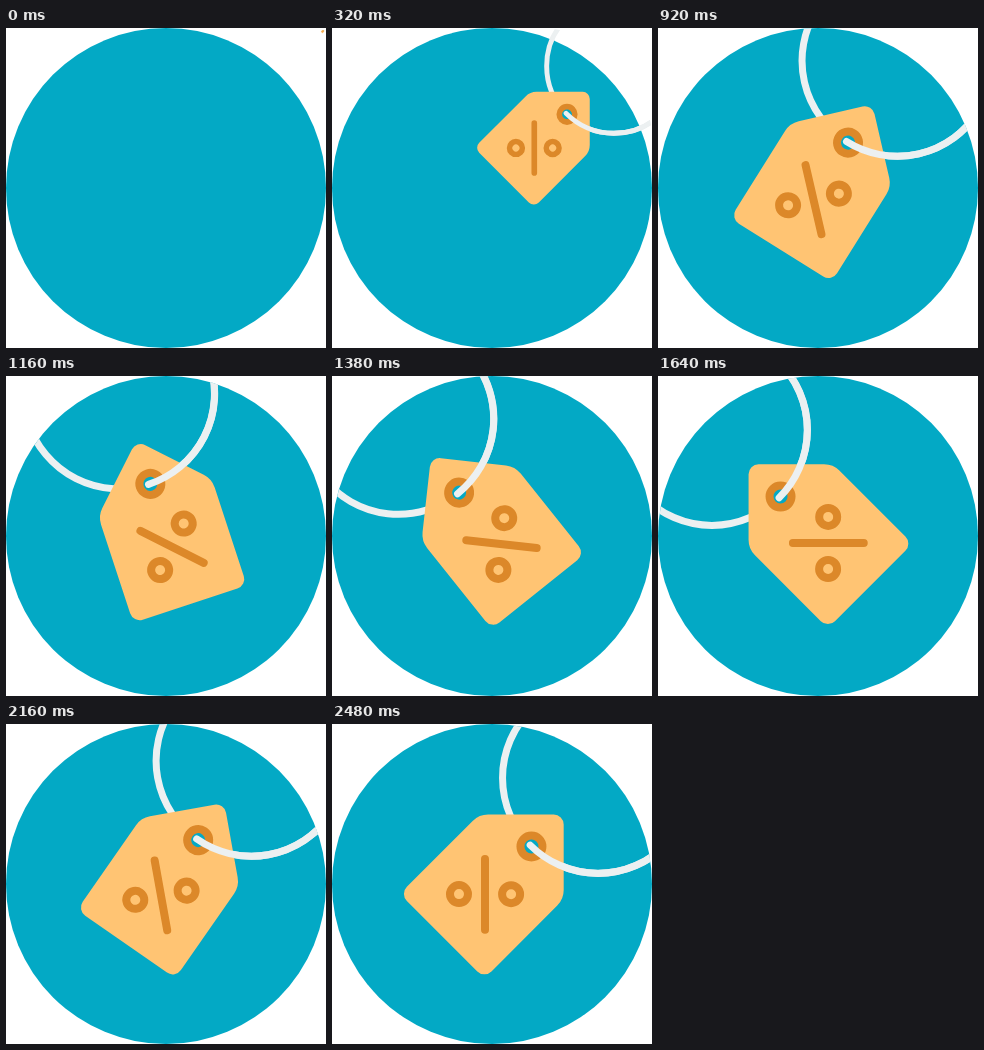
These frames come from a looping animation (320x320 px, 2500 ms). An HTML page:

```html
<!DOCTYPE html>
<html lang="en">
<head>
<meta charset="utf-8">
<title>Discount tag</title>
<style>
  html, body { margin: 0; width: 100%; height: 100%; overflow: hidden; background: #fff; }
  svg { display: block; width: 100%; height: 100%; }
  .mark { fill: none; stroke: #dc8829; stroke-width: 8; stroke-linecap: round; }
  .string { fill: none; stroke: #ecf0f1; stroke-width: 7; stroke-linecap: round; }
</style>
</head>
<body>
<svg viewBox="0 0 320 320">
  <defs>
    <clipPath id="disc"><circle r="160"/></clipPath>
  </defs>
  <circle cx="160" cy="160" r="160" fill="#03a9c5"/>
  <g id="swing">
    <g clip-path="url(#disc)">
      <circle class="string" cy="-150" r="95.5"/>
      <path id="body" fill="#ffc473"/>
      <circle class="mark" cx="1.4" cy="-54.4" r="11" style="fill:#03a9c5"/>
      <path class="string" d="M-.5 -54.5A95.5 95.5 0 0 0 0 -245.5"/>
      <path class="mark" d="M-22.7 -12.8L27.4 37.3"/>
      <circle class="mark" cx="20.7" cy="-6.3" r="9"/>
      <circle class="mark" cx="-16.2" cy="30.5" r="9"/>
    </g>
  </g>
</svg>
<script>
  const LOOP = 2500, PHASE = LOOP / 3, LEAD = 29, RATE = 0.99;
  const swing = document.getElementById('swing');

  // Closed polygon with rounded corners; each corner is [x, y, radius].
  function roundedPath(corners) {
    const n = corners.length;
    const parts = corners.map(([x, y, r], i) => {
      const [a, b] = [corners[(i + n - 1) % n], corners[(i + 1) % n]].map(([px, py]) => {
        const len = Math.hypot(px - x, py - y);
        return [(px - x) / len, (py - y) / len];
      });
      const angle = Math.acos(a[0] * b[0] + a[1] * b[1]);
      const cut = r / Math.tan(angle / 2);
      const at = v => (x + v[0] * cut).toFixed(2) + ' ' + (y + v[1] * cut).toFixed(2);
      return `${at(a)}A${r} ${r} 0 0 1 ${at(b)}`;
    });
    return 'M' + parts.join('L') + 'Z';
  }

  document.getElementById('body').setAttribute('d', roundedPath([
    [1.6, -99.8, 10], [61.4, -40, 22], [61.4, 72.2, 10], [-58.2, 72.2, 10], [-58.2, -40, 22]
  ]));

  // cubic-bezier(.25, .1, .25, 1)
  function ease(x) {
    if (x <= 0) return 0;
    if (x >= 1) return 1;
    let lo = 0, hi = 1;
    for (let i = 0; i < 30; i++) {
      const m = (lo + hi) / 2;
      if (0.75 * m * (1 - m) + m ** 3 < x) lo = m; else hi = m;
    }
    const t = lo, u = 1 - t;
    return 0.3 * t * u * u + 3 * t * t * u + t ** 3;
  }

  function draw(ms) {
    const p = (LEAD + RATE * ms) / PHASE;
    const scale = ease(p);
    const angle = 45 - 90 * ease(p - 1) + 90 * ease(p - 2);
    swing.setAttribute('transform',
      `translate(320 0) scale(${scale}) translate(-160 160) rotate(${angle})`);
  }

  const start = performance.now();
  function tick() {
    draw((performance.now() - start) % LOOP);
    requestAnimationFrame(tick);
  }
  tick();
</script>
</body>
</html>
```
